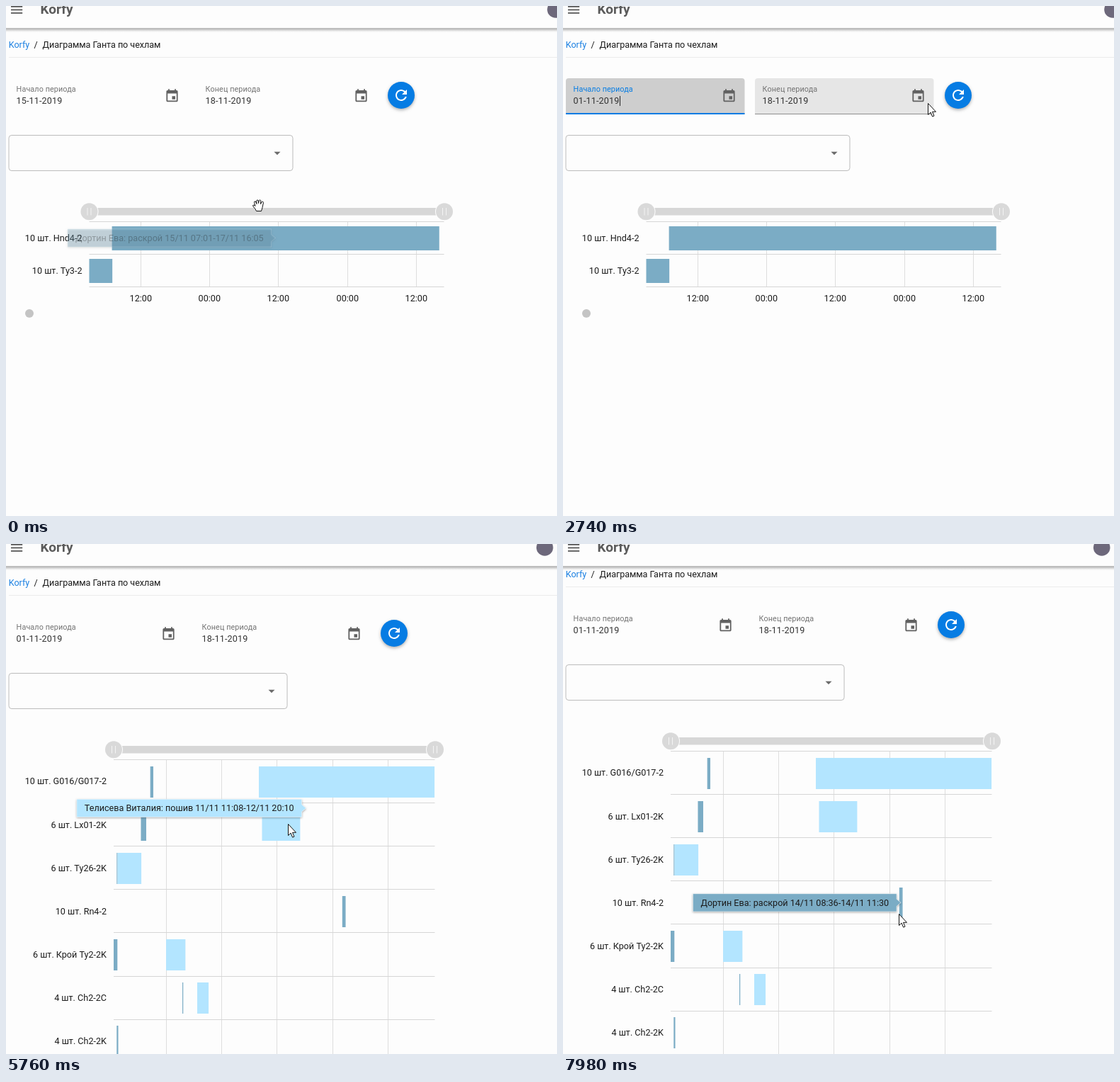
Animation of 778x720 px, one loop 8000 ms. Source, as an HTML page with a canvas:

```html
<!DOCTYPE html>
<html lang="ru">
<head>
<meta charset="utf-8">
<title>Диаграмма Ганта</title>
<style>
  html, body { margin: 0; width: 778px; height: 720px; overflow: hidden; background: #fdfdfd; }
  canvas { display: block; }
</style>
</head>
<body>
<canvas id="stage" width="778" height="720"></canvas>
<script>
const ctx = document.getElementById('stage').getContext('2d');
const LOOP = 8000, FONT = 'Roboto, "Open Sans", sans-serif';
const PAPER = '#fdfdfd', BLUE = '#067ce3', BRAND = 'Korfy';
const WORK = {
  cut: { color: '#7bacc5', title: 'раскрой', who: 'Дортин Ева' },
  sew: { color: '#b3e5ff', title: 'пошив', who: 'Телисева Виталия' }
};
// Moments of the story, ms
const PICK_OPEN = 1280, PICK_DATE = 2150, PICK_CLOSE = 2320, REFRESH = 3200, RELOAD = 4180, READY = 4960;

const clamp = v => Math.max(0, Math.min(1, v));
const mix = (a, b, s) => a + (b - a) * s;
const smooth = s => s * s * (3 - 2 * s);
const between = (t, a, b) => t >= a && t < b;

function fade(alpha, draw) {
  if (alpha <= 0) return;
  ctx.save();
  ctx.globalAlpha *= alpha;
  draw();
  ctx.restore();
}

function rect(x, y, w, h, color) {
  ctx.fillStyle = color;
  ctx.fillRect(x, y, w, h);
}

function round(x, y, w, h, radius) {
  ctx.beginPath();
  ctx.roundRect(x, y, w, h, radius);
}

function circle(x, y, r, color) {
  ctx.fillStyle = color;
  ctx.beginPath();
  ctx.arc(x, y, r, 0, 7);
  ctx.fill();
}

function text(str, x, y, { size = 12.6, color = '#1c1c1c', align = 'left', weight = 400, gap = 0 } = {}) {
  ctx.font = `${weight} ${size}px ${FONT}`;
  ctx.letterSpacing = gap + 'px';
  ctx.textAlign = align;
  ctx.fillStyle = color;
  ctx.fillText(str, x, Math.round(y));
  ctx.letterSpacing = '0px';
}

function raised(alpha, blur, dy, draw) {
  ctx.save();
  ctx.shadowColor = `rgba(0,0,0,${alpha})`;
  ctx.shadowBlur = blur;
  ctx.shadowOffsetY = dy;
  draw();
  ctx.restore();
}

function shape(path, x, y, scale, fill, stroke) {
  ctx.save();
  ctx.translate(x, y);
  ctx.scale(scale, scale);
  ctx.fillStyle = fill;
  ctx.fill(path);
  if (stroke) {
    ctx.strokeStyle = stroke;
    ctx.stroke(path);
  }
  ctx.restore();
}

const icons = {
  event: new Path2D('M17 12h-5v5h5v-5zM16 1v2H8V1H6v2H5c-1.11 0-1.99.9-1.99 2L3 19c0 1.1.89 2 2 2h14c1.1 0 2-.9 2-2V5c0-1.1-.9-2-2-2h-1V1h-2zm3 18H5V8h14v11z'),
  reload: new Path2D('M17.65 6.35C16.2 4.9 14.21 4 12 4c-4.42 0-7.99 3.58-7.99 8s3.57 8 7.99 8c3.73 0 6.84-2.55 7.73-6h-2.08c-.82 2.33-3.04 4-5.65 4-3.31 0-6-2.69-6-6s2.69-6 6-6c1.66 0 3.14.69 4.22 1.78L13 11h7V4l-2.35 2.35z'),
  down: new Path2D('M-4.5-2.2h9L0 2.3z'),
  arrow: new Path2D('M0 0V16l3.6-3.4 2.5 6 2.4-1-2.5-5.8H11z'),
  hand: new Path2D('M-1.5 11V1.2a1.4 1.4 0 0 1 2.9 0V7.5q2.8-1.3 3 .8 2.7-.9 2.9 1 2.4-.5 2.4 1.5v4q0 2-1.8 5H1q-1.2-2.6-4.5-6.2-1.7-2.2.2-2.8 1-.1 1.8 1z'),
  grab: new Path2D('M-3 8q-1-3-4.5-6.5-1.2-2.2 1-2 1 .3 2 1.5L-6-4q-.3-2 1.8-1.6L-2.5-2-3-6q.2-2 2.4-1.4L0-3 .8-7q1.5-1.7 2.6.3L3-2 4.8-5q2-1 2.2 1L5.5 3 4 8z')
};

// The cursor rests at each stop and glides between them
const stops = [
  { from: -LOOP, to: 60, x: 356, y: 281, kind: 'grab' },
  { from: 780, to: 880, x: 340, y: 112 },
  { from: 1110, to: 1450, x: 236, y: 128, kind: 'hand' },
  { from: 1800, to: 2250, x: 311, y: 137, kind: 'hand' },
  { from: 2700, to: 2780, x: 515, y: 137 },
  { from: 3030, to: 3210, x: 558, y: 126, kind: 'hand' },
  { from: 3680, to: 5050, x: 381, y: 210 },
  { from: 5740, to: 5880, x: 398, y: 395 },
  { from: 6120, to: 6140, x: 284, y: 645 },
  { from: 6520, to: 6540, x: 178, y: 460 },
  { from: 6720, to: 6920, x: 370, y: 517 },
  { from: 7400, to: LOOP, x: 474, y: 522 }
];

function cursorAt(t) {
  const i = stops.findLastIndex(s => t >= s.from);
  const a = stops[i], b = stops[i + 1] || a;
  const s = t <= a.to ? 0 : smooth((t - a.to) / (b.from - a.to));
  const kind = (s < .15 ? a : s > .85 ? b : {}).kind || 'arrow';
  return { x: mix(a.x, b.x, s), y: mix(a.y, b.y, s), kind };
}

function hovered(t, x, y, w, h) {
  if (between(t, PICK_OPEN, PICK_CLOSE) || between(t, REFRESH, READY)) return false;
  const c = cursorAt(t);
  return between(c.x, x, x + w) && between(c.y, y, y + h);
}

// Lights up at once, dims slowly after the cursor has left
function glow(t, ...box) {
  for (let age = 0; age < 300; age += 20)
    if (hovered(t - age, ...box)) return 1 - age / 300;
  return 0;
}

const shortChart = {
  left: 117.5, right: 618.5, from: '15/11 03:03', to: '17/11 16:55', step: .5, rowHeight: 46, bottom: 396.5,
  rows: [
    { name: '10 шт. Hnd4-2', cut: ['15/11 07:01', '17/11 16:05'] },
    { name: '10 шт. Ty3-2', cut: ['15/11 03:03', '15/11 07:05'] }
  ]
};
const longChart = {
  left: 152, right: 605.5, from: '06/11 02:43', to: '17/11 16:43', step: 2, rowHeight: 61.1, bottom: 740,
  rows: [
    { name: '10 шт. G016/G017-2', cut: ['07/11 10:24', '07/11 13:02'], sew: ['11/11 08:24', '17/11 16:27'] },
    { name: '6 шт. Lx01-2K', cut: ['07/11 02:18', '07/11 06:54'], sew: ['11/11 11:08', '12/11 20:10'] },
    { name: '6 шт. Ty26-2K', cut: ['06/11 05:21', '06/11 06:05'], sew: ['06/11 06:05', '07/11 02:41'], who: 'Пынева Рита' },
    { name: '10 шт. Rn4-2', cut: ['14/11 08:36', '14/11 11:30'] },
    { name: '6 шт. Крой Ty2-2K', cut: ['06/11 02:43', '06/11 05:58'], sew: ['08/11 00:06', '08/11 16:50'] },
    { name: '4 шт. Ch2-2C', cut: ['08/11 14:12', '08/11 14:56'], sew: ['09/11 03:04', '09/11 12:53'] },
    { name: '4 шт. Ch2-2K', cut: ['06/11 05:21', '06/11 06:42'] }
  ]
};
const TOP = 304.5;

// '11/11 06:00' is day 11.25
function day(str) {
  const [d, , h, m] = str.split(/[\/ :]/).map(Number);
  return d + h / 24 + m / 1440;
}

function dayX(c, d) {
  const from = day(c.from);
  return mix(c.left, c.right, (d - from) / (day(c.to) - from));
}

function chart(c, grow) {
  const width = c.right - c.left, row = i => TOP + i * c.rowHeight;
  for (let d = Math.ceil(day(c.from) / c.step) * c.step; d < day(c.to); d += c.step) {
    const x = Math.round(dayX(c, d));
    rect(x, TOP, 1, c.bottom - TOP, '#dedede');
    text(d % 1 ? '12:00' : '00:00', x + .3, c.bottom + 20.5, { align: 'center' });
  }
  for (let i = 0; i <= c.rows.length; i++)
    rect(c.left, Math.floor(row(i)), width, 1, '#d6d6d6');

  c.rows.forEach((r, i) => {
    const y0 = Math.round(row(i + .15)), y1 = Math.round(row(i + .87));
    for (const kind in WORK) {
      if (!r[kind]) continue;
      const [x0, x1] = r[kind].map(s => dayX(c, day(s)));
      rect(x0, y0, (x1 - x0) * grow, y1 - y0, WORK[kind].color);
    }
    text(r.name, c.left - 10, row(i + .5) + 4.4, { align: 'right' });
  });

  rect(c.left, 285, width, 10.5, '#d7d7d7');
  for (const x of [c.left, c.right + .5]) {
    circle(x, 290.3, 13, PAPER);
    circle(x, 290.3, 12, '#d9d9d9');
    rect(x - 3, 285, 1, 10.5, '#f4f4f4');
    rect(x + 2, 285, 1, 10.5, '#f4f4f4');
  }
}

const tips = [
  { chart: shortChart, row: 0, kind: 'cut', show: -900, hide: -160 },
  { chart: longChart, row: 0, kind: 'sew', show: 5350, hide: 5600 },
  { chart: longChart, row: 1, kind: 'sew', show: 5600, hide: 5980 },
  { chart: longChart, row: 5, kind: 'sew', show: 6070, hide: 6200 },
  { chart: longChart, row: 4, kind: 'sew', show: 6240, hide: 6380 },
  { chart: longChart, row: 2, kind: 'sew', show: 6470, hide: 6680 },
  { chart: longChart, row: 3, kind: 'cut', show: 7330, hide: LOOP }
];

function anchor({ chart, row, kind }) {
  const [a, b] = chart.rows[row][kind].map(day);
  return { x: dayX(chart, (a + b) / 2), y: TOP + (row + .5) * chart.rowHeight };
}

function drawTip(t) {
  const i = tips.findLastIndex(tip => t >= tip.show), tip = tips[i], last = tips[i - 1];
  // A tip that takes over from another slides from its place
  const slides = last && last.hide === tip.show;
  const goal = anchor(tip), start = slides ? anchor(last) : goal, s = clamp((t - tip.show) / 260);
  const x = mix(start.x, goal.x, s), y = mix(start.y, goal.y, s);
  const appear = slides ? 1 : clamp((t - tip.show) / 250);
  const row = tip.chart.rows[tip.row], work = WORK[tip.kind];
  const str = `${row.who || work.who}: ${work.title} ${row[tip.kind].join('-')}`;

  fade(appear * clamp(1 - (t - tip.hide) / 230), () => {
    ctx.font = `12.6px ${FONT}`;
    const w = ctx.measureText(str).width + 22, h = 12.7, side = x - w > 60 ? -1 : 1;
    const near = x + 6 * side, far = near + w * side;
    ctx.beginPath();
    ctx.moveTo(x, y);
    ctx.lineTo(near, y - 5);
    ctx.lineTo(near, y - h);
    ctx.lineTo(far, y - h);
    ctx.lineTo(far, y + h);
    ctx.lineTo(near, y + h);
    ctx.lineTo(near, y + 5);
    ctx.closePath();
    ctx.fillStyle = work.color;
    raised(.4, 3, 1, () => ctx.fill());
    ctx.strokeStyle = 'rgba(255,255,255,.6)';
    ctx.stroke();
    text(str, (near + far) / 2, y + 4.2, { align: 'center' });
  });
}

function field(x, w, label, date, t, focused) {
  const lit = glow(t, x, 102, w, 51);
  ctx.fillStyle = `rgba(0,0,0,${focused ? .19 : lit * .09})`;
  round(x, 102, w, 51, [4, 4, 0, 0]);
  ctx.fill();
  if (focused) rect(x, 151, w, 2, BLUE);
  else if (lit > .9) rect(x, 152, w, 1, '#8e8e8e');
  text(label, x + 10.6, 121, { size: 10.8, gap: .1, color: focused ? BLUE : '#737373' });
  text(date, x + 10.6, 138, { gap: .12, color: '#333' });
  const sincePick = t - PICK_DATE;
  if (focused && sincePick > 0 && sincePick % 1000 < 650) rect(x + 76, 127, 1, 14, '#222');
  shape(icons.event, x + w - 32.8, 116.4, .9, '#616161');
}

function content(t) {
  // The scrollbar that comes with the long chart narrows the page
  const w = t < RELOAD ? 252.5 : 247.5, second = w + 18.5, button = second + w + 34.5, list = w * 1.588;

  text(BRAND, 3.7, 59, { color: '#1b80e2' });
  text('/', 39.5, 59);
  text('Диаграмма Ганта по чехлам', 51.5, 59, { gap: -.05 });
  rect(4, 72, 774, 1, '#ececec');

  field(4, w, 'Начало периода', (t < PICK_DATE ? '15' : '01') + '-11-2019', t, between(t, 1220, REFRESH));
  field(second, w, 'Конец периода', '18-11-2019', t, false);

  raised(.3, 4, 2, () => circle(button, 126, 19, BLUE));
  shape(icons.reload, button - 12, 114, 1, '#fff');

  ctx.strokeStyle = hovered(t, 4, 182, list, 51) ? '#333' : '#bcbcbc';
  round(4, 182.5, list, 50, 4);
  ctx.stroke();
  shape(icons.down, list - 18, 208, 1, '#6b6b6b');

  if (t < REFRESH + 100) {
    chart(shortChart, 1);
    circle(33, 434, 6, '#c4c4c4');
  }
  fade(clamp((t - 4300) / 450), () =>
    chart(longChart, 1 - (1 - clamp((t - 4400) / 700)) ** 3));
  drawTip(t);

  const veil = clamp((t - REFRESH) / 250) - clamp((t - RELOAD - 40) / 480);
  fade(.55 * veil, () => rect(0, 0, 778, 740, PAPER));
}

function header(t) {
  const edge = ctx.createLinearGradient(0, 31, 0, 38);
  edge.addColorStop(0, '#b5b5b5');
  edge.addColorStop(.35, '#cacaca');
  edge.addColorStop(1, 'rgba(253,253,253,0)');
  rect(0, 0, 778, 31, PAPER);
  rect(0, 31, 778, 7, edge);
  for (let i = 0; i < 3; i++) rect(7, i * 4.5, 16.2, 1.8, '#5a5a5a');
  text(BRAND, 48.5, 11, { size: 19, weight: 700, color: '#5b5b5b' });
  circle(t < RELOAD ? 776 : 760.7, 5, 11.8, '#6d687b');
}

// Month popup; November 2019 starts on a Friday
function picker(t) {
  const alpha = clamp((t - PICK_OPEN) / 120) * clamp((PICK_CLOSE - t) / 120);
  fade(alpha, () => {
    const x = 144, y = 32, col = i => x + 25 + i * 36;
    ctx.translate(0, y * (1 - alpha) * .3);
    ctx.fillStyle = '#fff';
    round(x, y, 266, 318, 4);
    raised(.3, 7, 2, () => ctx.fill());
    text('НОЯБ. 2019', x + 21, y + 37, { weight: 500, color: '#555' });
    shape(icons.down, x + 106, y + 33, 1, '#777');
    text('‹', x + 196, y + 38, { size: 20, color: '#777' });
    text('›', x + 232, y + 38, { size: 20, color: '#777' });
    ['Пн', 'Вт', 'Ср', 'Чт', 'Пт', 'Сб', 'Вс'].forEach((s, i) =>
      text(s, col(i), y + 72, { size: 10, align: 'center', color: '#8a8a8a' }));
    rect(x, y + 81, 266, 1, '#e3e3e3');
    text('НОЯБ.', x + 14, y + 110, { size: 11.7, color: '#777' });
    for (let n = 1; n <= 30; n++) {
      const cx = col((n + 3) % 7), cy = y + 106 + 36 * Math.floor((n + 3) / 7);
      const chosen = n === (t < PICK_DATE ? 15 : 1);
      if (chosen) circle(cx, cy, 16, BLUE);
      else if (n === 1 && t > 1750) circle(cx, cy, 16, '#ececec');
      text(n, cx, cy + 4, { size: 11.7, align: 'center', color: chosen ? '#fff' : '#333' });
    }
  });
}

function draw(t) {
  // The page begins to scroll in growing jumps
  const jumps = Math.max(0, Math.floor((t - 7755) / 75));
  rect(0, 0, 778, 720, PAPER);
  ctx.save();
  ctx.translate(0, -2 * jumps * (jumps + 1) / 2);
  content(t);
  ctx.restore();
  header(t);
  picker(t);
  const c = cursorAt(t);
  shape(icons[c.kind], c.x + .5, c.y + .5, 1, '#fff', '#111');
}

function frame() {
  draw(performance.now() % LOOP);
  requestAnimationFrame(frame);
}
frame();
</script>
</body>
</html>
```
